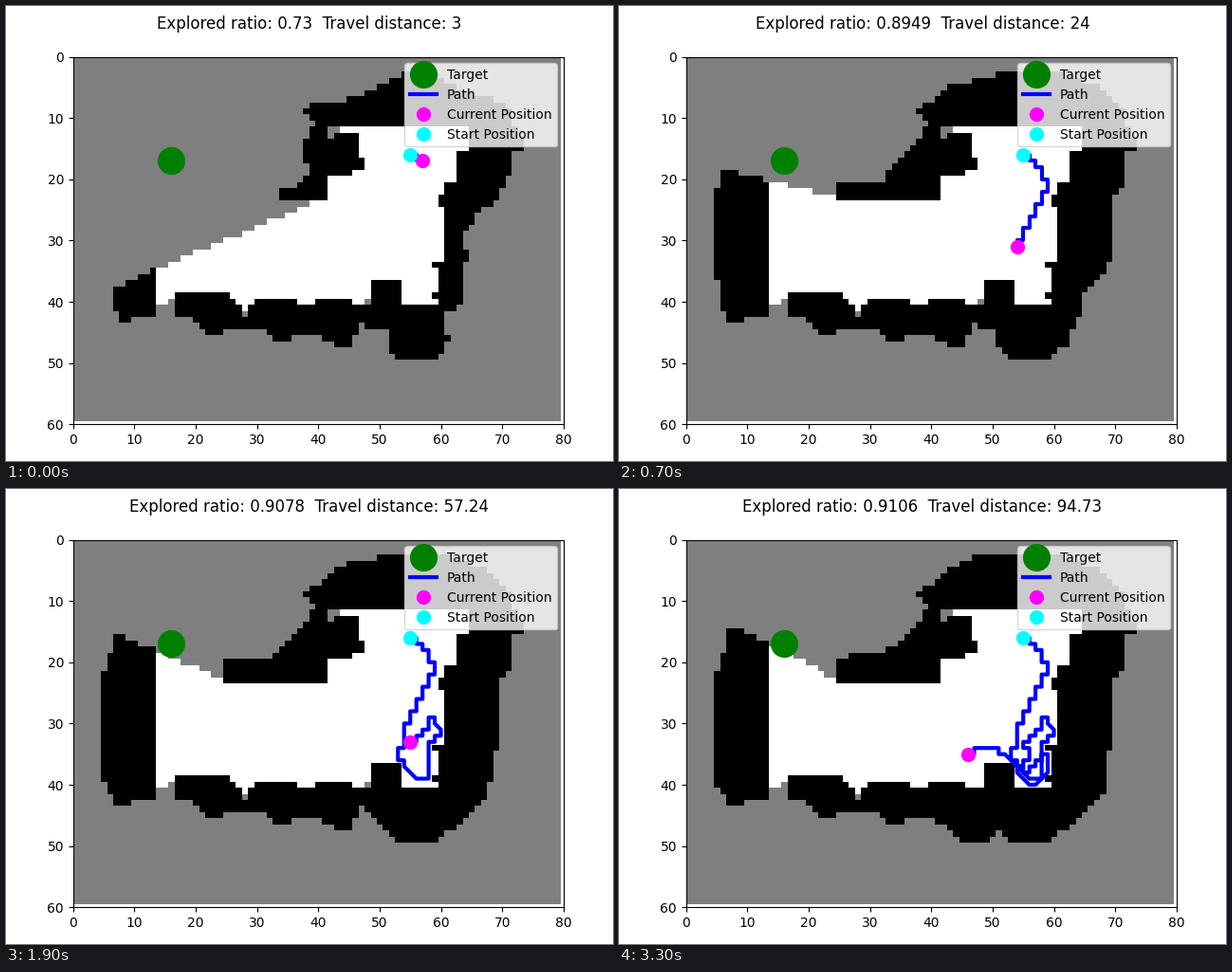
A matplotlib script that plays this animation: 640 px wide and 480 px high, repeating every 3.4 s.

```python
import numpy as np
import matplotlib.pyplot as plt
from matplotlib.animation import FuncAnimation

W, H, ROWS, COLS = 640, 480, 60, 80
STEP_MS, PACE = 100, 3
WALL, UNKNOWN, FREE = 0, 127, 255
START, TARGET = (55, 16), (16, 17)

# Floor plan as blocks: first column, last column, first row, last row
ROOMS = [(42, 64, 12, 12), (47, 64, 13, 15), (47, 62, 16, 20), (42, 60, 20, 40),
         (14, 60, 24, 40), (14, 24, 10, 23), (46, 46, 19, 19), (42, 42, 13, 13),
         (14, 16, 41, 43), (28, 28, 41, 42)]
ROCKS = [(47, 47, 17, 18), (60, 60, 23, 24), (60, 60, 34, 40), (59, 59, 34, 34),
         (59, 59, 39, 39), (17, 25, 39, 40), (26, 26, 40, 40), (30, 36, 40, 40),
         (40, 45, 40, 40), (49, 53, 37, 40)]

# Each line is one planned leg of the walk
LEGS = """
E S E S E S S E S S W S S W S S W S S W S S W S S S S W S S E S SE SE
E E
N N N N N N E N E N NW
N W S S W S W S W
S E S S W S W
S SE SE E
NE NE N N N
W S W S W S W N W NW NW
W N
W W W W S W
"""

RATIO_TIMES = [0, 3, 7, 11, 31, 32]
RATIOS = [0.73, 0.8728, 0.8949, 0.9078, 0.9078, 0.9106]

solid = np.ones((ROWS, COLS), bool)
for blocks, value in ((ROOMS, False), (ROCKS, True)):
    for c0, c1, r0, r1 in blocks:
        solid[r0:r1 + 1, c0:c1 + 1] = value

# Rays measured in grid steps, so walls are seen to a fixed number of cells
RAYS, SAMPLE, DEPTH = 720, 0.2, 8.9
angles = np.linspace(0, 2 * np.pi, RAYS, endpoint=False)
rays = np.column_stack([np.cos(angles), np.sin(angles)])
rays /= np.abs(rays).sum(axis=1, keepdims=True)
reach = np.arange(0, COLS + ROWS, SAMPLE)


def scan(grid, pos):
    """Mark what is seen from pos: open cells, then some way into the wall."""
    x, y = (np.rint(p + np.outer(d, reach)).astype(int).clip(0, top - 1)
            for p, d, top in zip(pos, rays.T, (COLS, ROWS)))
    blocked = solid[y, x]
    hit = reach[blocked.argmax(axis=1)][:, None]
    is_open = reach < hit
    inside = blocked & (reach >= hit) & (reach < hit + DEPTH)
    grid[y[is_open], x[is_open]] = FREE
    grid[y[inside], x[inside]] = WALL


def walk():
    """Path, distance and map after each frame of the walk."""
    grid = np.full((ROWS, COLS), UNKNOWN, np.uint8)
    route, distance, states = [START], 0, []
    scan(grid, START)
    for leg in LEGS.strip().splitlines():
        moves = leg.split()
        for k in range(0, len(moves), PACE):
            for m in moves[k:k + PACE]:
                dx, dy = ("E" in m) - ("W" in m), ("S" in m) - ("N" in m)
                route.append((route[-1][0] + dx, route[-1][1] + dy))
                distance += np.hypot(dx, dy)
                scan(grid, route[-1])
            states.append((np.array(route), distance, grid.copy()))
    return states


states = walk()

fig, ax = plt.subplots(figsize=(W / 100, H / 100), dpi=100)
image = ax.imshow(states[0][2], cmap="gray", vmin=0, vmax=255, interpolation="nearest")
ax.set_xlim(0, COLS)
ax.set_ylim(ROWS, 0)
ax.plot(*TARGET, "o", color="green", ms=20, ls="none", label="Target")
path, = ax.plot([], [], color="blue", lw=3, label="Path")
current, = ax.plot([], [], "o", color="magenta", ms=10, ls="none", label="Current Position")
ax.plot(*START, "o", color="cyan", ms=10, ls="none", label="Start Position")
ax.legend(loc="upper right")
title = fig.suptitle("Explored ratio")
fig.tight_layout()


def draw(i):
    route, distance, grid = states[i]
    image.set_data(grid)
    path.set_data(*route.T)
    current.set_data(*route[-1:].T)
    ratio = np.interp(i, RATIO_TIMES, RATIOS)
    title.set_text(f"Explored ratio: {round(ratio, 4):g}  "
                   f"Travel distance: {round(distance, 2):g}")
    return image, path, current, title


anim = FuncAnimation(fig, draw, frames=len(states), interval=STEP_MS, repeat=True,
                     repeat_delay=0)
plt.show()
```
